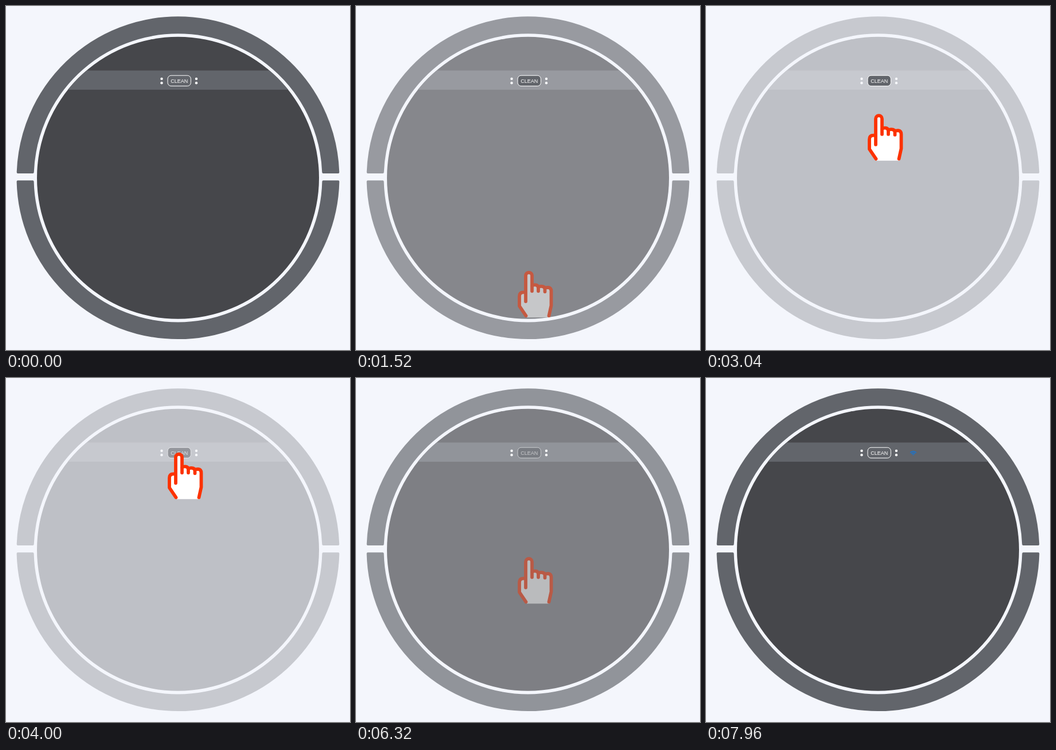
Animation of 600x600 px, one loop 8 s. Source, as an HTML page:

```html
<!DOCTYPE html>
<html lang="en">
<head>
<meta charset="utf-8">
<title>Clean button</title>
<style>
  html, body { margin: 0; height: 100%; overflow: hidden; background: #f4f6fc; }
  svg { display: block; width: 100%; height: 100%; }
  text { font: 9px "Liberation Sans", Arial, sans-serif; }
</style>
</head>
<body>
<svg viewBox="0 0 600 600">
  <clipPath id="disc"><circle cx="300" cy="299.8" r="246"/></clipPath>
  <g id="robot">
    <g fill="#62656b" stroke="#62656b" stroke-width="4" stroke-linejoin="round">
      <path d="M20.67 290A279.5 279.5 0 0 1 579.33 290H553.31A253.5 253.5 0 0 0 46.69 290Z"/>
      <path d="M20.58 306.3A279.5 279.5 0 0 0 579.42 306.3H553.42A253.5 253.5 0 0 1 46.58 306.3Z"/>
    </g>
    <circle cx="300" cy="299.8" r="246" fill="#46474b"/>
    <rect x="50" y="112.5" width="500" height="33.5" fill="#62656b" clip-path="url(#disc)"/>
    <g fill="#fff">
      <circle cx="271.5" cy="127" r="2.2"/><circle cx="271.5" cy="134.3" r="2.2"/>
      <circle cx="332" cy="127" r="2.2"/><circle cx="332" cy="134.3" r="2.2"/>
    </g>
  </g>
  <g id="button">
    <rect x="282" y="121.2" width="40.4" height="18.4" rx="6" fill="#62656b" stroke="#fff"/>
    <text x="302.2" y="133.8" text-anchor="middle" fill="#fff">CLEAN</text>
  </g>
  <g id="wifi" fill="none" stroke="#1b74cc" stroke-width="1.7">
    <path d="M356.2 130.2Q361.5 126.2 366.8 130.2M358.3 132.3Q361.5 129.8 364.7 132.3"/>
    <path d="M359.8 133.2H363.2L361.5 135.6Z" fill="#1b74cc" stroke="none"/>
  </g>
  <g id="hand">
    <path fill="#fff" d="M298 82L285 62V45Q285 38 292 38H296V9A5.5 5.5 0 0 1 307 9V26L312 25L318 29L323 27.5L329.5 31L335 29.5Q340.5 30 340.5 36V61L337 82Z"/>
    <path fill="none" stroke="#fc3200" stroke-width="5.8" stroke-linecap="round" stroke-linejoin="round"
      d="M296.5 79L285 62V45Q285 38 292 38H296M296 54V9A5.5 5.5 0 0 1 307 9V36M307 27Q309 25 312 25Q318 25 318 31V36M318 29Q320 27.5 323 27.5Q329.5 27.5 329.5 33V37M329.5 31Q331 29.5 335 29.5Q340.5 30 340.5 36V61L336.5 79"/>
  </g>
</svg>
<script>
const LOOP = 8000, LOW = 461.3, HIGH = 129.3;
const [robot, button, wifi, hand] =
  ["robot", "button", "wifi", "hand"].map(id => document.getElementById(id));

const ramp = (t, from, to) => Math.min(1, Math.max(0, (t - from) / (to - from)));
const cubic = p => p < 0.5 ? 4 * p ** 3 : 1 - 4 * (1 - p) ** 3;
const smooth = p => p * p * (3 - 2 * p);

// Triangle wave from 0 to 1 and back
function pulse(t, start, half) {
  const p = Math.max(0, t - start) / half % 2;
  return p < 1 ? p : 2 - p;
}

function draw(t) {
  const shown = ramp(t, 1000, 1980) - ramp(t, 5980, 6620);
  const lift = cubic(ramp(t, 2456, 3360)) - smooth(ramp(t, 5980, 6620));
  const press = ramp(t, 3120, 3320) - ramp(t, 6690, 6990);
  robot.style.opacity = 1 - 0.7 * shown;
  hand.style.opacity = shown;
  hand.setAttribute("transform", `translate(0 ${LOW + (HIGH - LOW) * lift})`);
  button.style.opacity = 1 - 0.5 * press;
  wifi.style.opacity = pulse(t, 6680, 427);
}

const begin = performance.now();
function tick() {
  draw((performance.now() - begin) % LOOP);
  requestAnimationFrame(tick);
}
tick();
</script>
</body>
</html>
```
